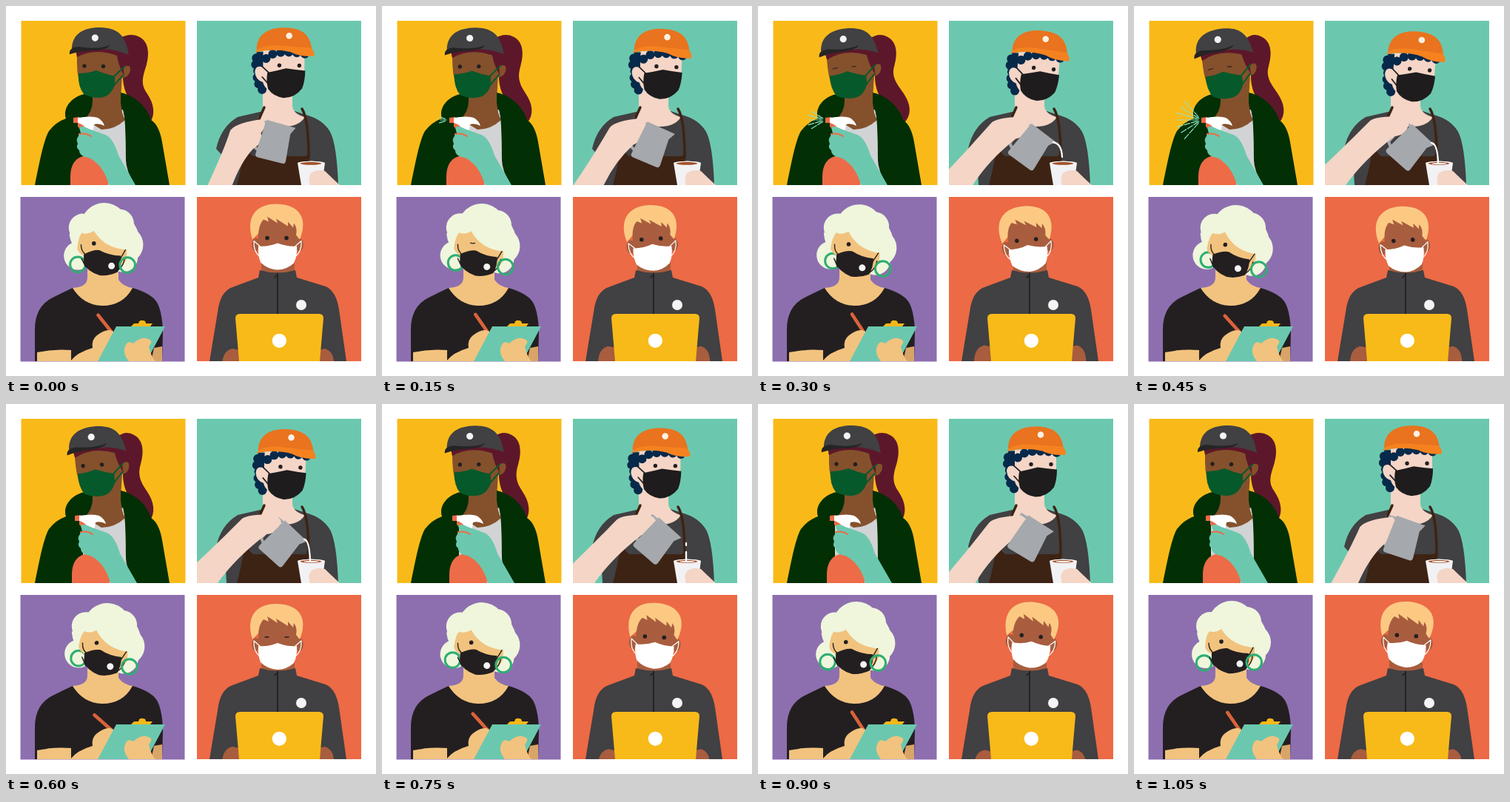
An HTML page that plays this animation: 500 by 500 pixels, repeating every 1200 ms.

```html
<!DOCTYPE html>
<html lang="en">
<head>
<meta charset="utf-8">
<title>Four masked workers</title>
<style>
  html, body { margin: 0; width: 100%; height: 100%; overflow: hidden; background: #fff; }
  svg { display: block; width: 100vw; height: 100vh; }
  .line { fill: none; stroke-linecap: round; stroke-linejoin: round; }
</style>
</head>
<body>
<svg viewBox="0 0 500 500">
  <defs>
    <clipPath id="c1"><rect x="20.5" y="20" width="222" height="222"/></clipPath>
    <clipPath id="c2"><rect x="258" y="20" width="222" height="222"/></clipPath>
    <clipPath id="c3"><rect x="19.5" y="258" width="222" height="222.5"/></clipPath>
    <clipPath id="c4"><rect x="258" y="258" width="222" height="222"/></clipPath>
  </defs>

  <!-- Cleaner -->
  <g clip-path="url(#c1)">
    <rect x="20" y="20" width="223" height="223" fill="#f9ba19"/>
    <path id="ponytail" fill="#5d172a"/>
    <path fill="#022f04" d="M39 242C45 212 51 181 58 169Q67 157 81 152C76 137 90 120 112 118L155 117C178 122 192 140 196 154Q207 161 211 184L221 242Z"/>
    <path fill="#d2d3d5" d="M104 152L158 140Q162 150 162 208L176 242H104Z"/>
    <path fill="#84512c" d="M117 100L157 92L155 128Q156 146 161 154Q147 167 129 167L106 153Q117 143 117 128Z"/>
    <path fill="#022f04" d="M155 117L182 140L205 242H174Q162 222 162 208C162 170 163 150 155 130Z"/>
    <g id="cleanerHead">
      <path fill="#84512c" d="M96 58H160V82Q169 78 168 87Q166 97 156 97Q153 114 136 122Q118 128 104 115Q96 100 96 78Z"/>
      <path fill="#5d172a" d="M94 58L166 58V80H160Q158 87 160 95Q153 84 150 67Q120 56 96 69Z"/>
      <path fill="#414042" d="M89 58C90 36 106 29 128 29C150 30 162 38 166 66Q148 58 128 58Z"/>
      <path fill="#252425" d="M86 65Q85 56 98 55Q125 59 141 53Q137 59 120 60Q102 60 86 65Z"/>
      <circle cx="120.5" cy="43" r="4.6" fill="#f4f4f4"/>
      <path class="line" stroke="#06592b" stroke-width="2" d="M144 97L160 82M145 108L158 94"/>
      <path fill="#06592b" d="M98 91Q111 91 122 87Q134 92 147 95V107Q142 120 132 123Q119 126 105 119Q97 109 98 91Z"/>
      <g class="eyes" fill="#231f20"><circle cx="106" cy="81" r="2.7"/><circle cx="131.5" cy="81.5" r="2.7"/></g>
      <path class="line lids" stroke="#231f20" stroke-width="1.2" d="M103 82L109 81M129 81L134.5 81.5"/>
    </g>
    <path id="spray" class="line" stroke="#8ce0c6" stroke-width="1.2"/>
    <g id="bottle">
      <path fill="#ed6b47" d="M87 242V231Q87 208 104 203V190H121V204Q135 210 138 226V242Z"/>
      <path fill="#ed6b47" d="M91 151L99 150V158H91ZM97 158L116 157V176H101Q102 166 97 163Z"/>
      <path fill="#fff" d="M97 151Q116 148 124 151Q131 155 133 162Q126 158 119 160L117 171H107Q109 161 97 158Z"/>
      <path fill="#6bc8ae" d="M99 164Q104 161 112 166L134 174Q145 178 152 202L175 242H139Q132 215 112 205Q99 203 99 195Q94 192 97 186Q94 180 98 176Q98 172 101 172Z"/>
      <path class="line" stroke="#ed6b47" stroke-width="2" d="M99 173Q108 171 115 176"/>
    </g>
  </g>

  <!-- Barista -->
  <g clip-path="url(#c2)">
    <rect x="258" y="20" width="222" height="222" fill="#6bc8ae"/>
    <path fill="#414042" d="M298 242L296 206L284 193Q290 164 313 150L348 142H390L405 147Q428 153 438 170Q447 187 449 242Z"/>
    <path fill="#f4d5c6" d="M347 98H387V135Q388 146 404 150Q396 163 375 163Q352 162 340 151Q347 148 347 138Z"/>
    <path class="line" stroke="#3d2314" stroke-width="3.5" d="M349 137Q338 160 327 195M400 139Q409 153 409 205"/>
    <path fill="#3d2314" d="M324 182Q326 198 334 203H405L410 198L411 242H312Q320 212 324 182Z"/>
    <path id="handle" class="line" stroke="#a5a8ac" stroke-width="4" d="M-18 -22H-26V13L-18 17"/>
    <path id="pourArm" fill="#f4d5c6"/>
    <path id="jug" fill="#a5a8ac" d="M-18 -26L23 -25L18 -15L21 22Q21 26 17 26H-17Q-21 26 -21 22Z"/>
    <path fill="#f2f1f4" d="M394 212Q412 207 431 212L427 242H399Z"/>
    <ellipse cx="412.5" cy="212.5" rx="18.5" ry="2.8" fill="#fff"/>
    <ellipse cx="412" cy="212.8" rx="14.5" ry="2" fill="#a2512b"/>
    <ellipse id="foam" cx="412.5" cy="213" rx="10" ry="1.1" fill="#fff"/>
    <path id="milk" class="line" stroke="#fff" stroke-width="2.3"/>
    <path fill="#f4d5c6" d="M411 242Q407 231 413 225Q421 220 431 223Q440 232 451 242Z"/>
    <g id="baristaHead">
      <path id="curls" class="line" stroke="#07294a" stroke-width="12" stroke-dasharray="0 9" d="M346 113Q337 103 340 88Q333 76 341 64"/>
      <path fill="#07294a" d="M338 62H354V110L347 118Q339 108 338 62Z"/>
      <path fill="#f4d5c6" d="M347 60H403V100Q394 123 375 123Q350 116 347 103Q337 100 336 89Q337 79 347 83Z"/>
      <path class="line" stroke="#07294a" stroke-width="12" stroke-dasharray="0 11" d="M351 71Q362 57 408 65"/>
      <path fill="#e9731e" d="M338 59C338 39 352 29 376 29C400 29 411 39 413 60Z"/>
      <path fill="#f5821f" d="M336 63Q341 53 366 53L411 56Q416 59 416 67Q398 69 384 62Q360 56 336 63Z"/>
      <circle cx="382" cy="40" r="4.3" fill="#fff0e2"/>
      <path class="line" stroke="#1e1c1d" stroke-width="1.7" d="M346 82L356 91M346 96L356 107"/>
      <path fill="#1e1c1d" d="M353 90Q367 87 378 84Q391 86 404 87Q404 101 400 111Q390 124 375 124Q361 122 354 112Q351 101 353 90Z"/>
      <g fill="#231f20"><circle cx="369" cy="80" r="2.7"/><circle cx="396" cy="80" r="2.7"/></g>
    </g>
  </g>

  <!-- Clerk -->
  <g clip-path="url(#c3)">
    <rect x="19" y="258" width="223" height="223" fill="#8d6fb0"/>
    <g id="hairBack" fill="#eff6dc">
      <circle cx="97" cy="338" r="19"/><circle cx="160" cy="322" r="25"/><circle cx="158" cy="339" r="20"/>
      <circle cx="103" cy="300" r="19"/><circle cx="132" cy="298" r="32"/><circle cx="152" cy="294" r="20"/>
    </g>
    <path fill="#231f20" d="M39 480V437Q39 406 63 394Q77 387 90 381H171Q195 388 203 399Q211 411 212 440L211 480Z"/>
    <path fill="#f2c37f" d="M110 348H152V370Q158 379 171 381Q158 405 130 405Q104 404 90 381Q110 380 110 367ZM42 468Q65 463 88 465V480H42Z"/>
    <circle id="ringL" class="line" stroke="#2fae72" stroke-width="3" r="10.3"/>
    <g id="clerkHead">
      <path fill="#f2c37f" d="M96 300H163V342Q152 363 128 364Q108 357 104 337Q94 333 95 319Z"/>
      <path fill="#eff6dc" d="M85 310Q95 280 130 270Q177 278 181 320L164 347V329Q133 328 118 304Q109 310 102 307Q97 312 96 329Q88 326 85 310Z"/>
      <path class="line" stroke="#231f20" stroke-width="1.4" d="M101 323Q101 333 109 337M108 353L102 342M154 342L161 329M151 357Q160 350 160 340"/>
      <path fill="#231f20" d="M105 336Q118 329 126 330Q139 337 155 337Q156 350 151 359Q139 365 127 364Q110 359 105 348Z"/>
      <circle id="clerkEye" cx="118" cy="321" r="2.8" fill="#231f20"/>
      <path id="clerkLid" class="line" stroke="#231f20" stroke-width="1.3" d="M118 320Q121 321 124 320"/>
      <circle id="maskDot" cx="143" cy="351" r="4.5" fill="#f4f4f4"/>
    </g>
    <circle id="ringR" class="line" stroke="#2fae72" stroke-width="3" r="10.3"/>
    <path id="pen" class="line" stroke="#d9633a" stroke-width="4.6"/>
    <path fill="#f2c37f" d="M87 480Q96 468 117 462Q115 451 123 445Q133 437 141 438Q149 440 149 452L146 480Z"/>
    <path fill="#d9a467" d="M200 462L211 460V480H196Z"/>
    <path fill="#6bc8ae" d="M149 433H215L190 480H124Z"/>
    <path fill="#f6b719" d="M169 433L173 429H179Q180 424 185 425Q189 425 189 429H198L195 433Z"/>
    <path fill="#f2c37f" d="M166 480Q157 469 161 460Q164 451 172 456Q183 446 192 450Q200 452 193 460Q196 474 202 480Z"/>
  </g>

  <!-- Laptop worker -->
  <g clip-path="url(#c4)">
    <rect x="258" y="258" width="222" height="222" fill="#ec6a45"/>
    <path fill="#a85d3e" d="M345 325H390V369H345Z"/>
    <path fill="#414042" d="M275 480L286 414Q289 386 306 380L341 367L343 357Q367 364 391 357L393 367L432 379Q446 385 450 410L460 480Z"/>
    <path class="line" stroke="#1f1d1e" stroke-width="1.6" d="M367 361V417M367 363L363 367"/>
    <circle cx="399" cy="404" r="7" fill="#f4f4f4"/>
    <path id="laptopHands" fill="#a85d3e" d="M292 490Q291 466 306 463L320 466V490ZM443 490Q445 467 431 463L418 466V490Z"/>
    <path fill="#f8ba19" d="M316 416H423Q429 416 429 422L424 480H315L310 422Q310 416 316 416Z"/>
    <circle cx="369.3" cy="452.3" r="9.6" fill="#fff"/>
    <g id="typistHead">
      <ellipse cx="338" cy="322" rx="6" ry="9" fill="#a85d3e"/><ellipse cx="396" cy="322" rx="6" ry="9" fill="#a85d3e"/>
      <path fill="#a85d3e" d="M341 285H394V325Q389 353 368 354Q345 350 341 325Z"/>
      <path fill="#fcc983" d="M333 315C324 286 336 267 366 267C399 268 408 289 397 315L392 309Q394 299 389 293L388 299L381 291V297L365 287L367 293L353 284L355 291L348 288Q342 294 341 307Z"/>
      <path class="line" stroke="#fff" stroke-width="1.2" d="M343 324L335 317Q334 332 344 339M391 324L399 317Q400 332 390 339"/>
      <path fill="#fff" d="M341 324Q355 325 367 320Q380 325 393 324Q394 337 389 347Q379 356 367 356Q353 355 344 346Q340 336 341 324Z"/>
      <g class="eyes" fill="#231f20"><circle cx="353" cy="313" r="2.8"/><circle cx="379" cy="313" r="2.8"/></g>
      <path class="line lids" stroke="#231f20" stroke-width="1.3" d="M350 312H355M377 312H382"/>
    </g>
  </g>
</svg>
<script>
const STEP = 150, STEPS = 8;
const $ = id => document.getElementById(id);
const set = (id, name, value) => $(id).setAttribute(name, value);
const show = (node, on) => { node.style.display = on ? "" : "none"; };

function turn(id, angle, x, y, drop) {
  set(id, "transform", `translate(0 ${drop}) rotate(${angle} ${x} ${y})`);
}

function place(id, x, y) {
  set(id, "cx", x);
  set(id, "cy", y);
}

function blink(id, closed) {
  show($(id).querySelector(".eyes"), !closed);
  show($(id).querySelector(".lids"), closed);
}

// Fan of droplets that widens and lengthens with each puff.
function sprayPath(puff) {
  let d = "";
  for (let ring = 0; ring < puff; ring++) {
    for (let i = -puff; i <= puff; i++) {
      const start = 4 + 10 * ring + 2 * (i & 1), angle = i * .28;
      const at = r => `${91 - r * Math.cos(angle)} ${154 + r * Math.sin(angle)}`;
      d += `M${at(start)}L${at(start + 8)}`;
    }
  }
  return d;
}

function drawCleaner(step, wave) {
  const nod = wave(3) ** 2;
  turn("cleanerHead", -7 * nod, 128, 103, nod);
  blink("cleanerHead", step === 2 || step === 3);

  const a = 3 - 8 * wave(3.5), b = 7 * wave(2) ** 3;
  set("ponytail", "d", `M150 45Q${166 + a} 35 ${178 + a} 42C${191 + a} 49 ${191 + a} 66 ${187 + a} 80` +
    `C${182 + a} 96 ${181 + b} 105 ${189 + b} 117C${200 + b} 133 ${201 + b} 147 ${194 + b / 2} 158` +
    `Q${188 + b / 2} 147 176 136Q157 120 158 92Z`);

  const slide = 2 * Math.min(3, Math.max(0, step - 3));
  set("bottle", "transform", `translate(${slide} 0)`);
  set("spray", "d", step < 4 ? sprayPath(step) : "");
}

function drawBarista(step, wave) {
  turn("baristaHead", 5 * wave(2.5) ** 2, 370, 125, 5 * wave(3.5));

  const w = Math.sin(wave(3.8) * Math.PI / 2);
  set("pourArm", "d", `M${273 - 45 * w} 242` +
    `C${285 - 20 * w} ${215 - 7 * w} ${297 - 7 * w} ${188 - 4 * w} ${303 + 15 * w} ${168 - 12 * w}` +
    `Q${312 + 12 * w} ${157 - 8 * w} ${347 + 14 * w} ${153 - 4 * w}` +
    `Q${354 + 22 * w} ${160 - 4 * w} ${344 + 26 * w} ${172 - 8 * w}` +
    `Q${350 + 18 * w} ${182 - 8 * w} ${334 + 18 * w} ${193 - 17 * w}` +
    `Q${318 - 8 * w} ${210 - 2 * w} ${306 - 20 * w} 242Z`);

  const x = 363 + 10 * wave(3.8), y = 181 + 10 * wave(2.7), tilt = 14 + 28 * w;
  for (const id of ["jug", "handle"]) set(id, "transform", `translate(${x} ${y}) rotate(${tilt})`);

  const pouring = step >= 2 && step <= 4;
  const stream = `M${x + 30} ${y - 6}Q410 ${y - 5} 411 ${Math.min(212, 184 + 10 * step)}`;
  set("milk", "d", pouring ? stream : step === 5 ? "M411 188V191M411 200V212" : "");
  show($("foam"), step > 2);
}

function drawClerk(step, wave, angle) {
  const tilt = 6.5 * wave(3);
  for (const id of ["clerkHead", "hairBack"]) turn(id, tilt, 133, 348, 3 * wave(3.5));
  show($("clerkEye"), step !== 1);
  show($("clerkLid"), step === 1);
  set("clerkEye", "cx", 118 + tilt / 3);
  set("maskDot", "cx", 143 - tilt / 3);
  place("ringL", 94 + 7 * wave(2.2), 350 - 7 * wave(3.2));
  place("ringR", 162 + 7 * wave(2.5), 349 + 7 * wave(3));

  const penX = 124.5 + 2.5 * (Math.cos(angle) - Math.cos(2 * angle));
  set("pen", "d", `M${penX} ${418 + (124 - penX) / 2}L143 441`);
}

function drawTypist(step, wave, angle) {
  const sway = -Math.sin(angle);
  turn("typistHead", 5 * sway, 367, 350, 3.5 * wave(3));
  blink("typistHead", step === 4);
  set("laptopHands", "transform", `translate(0 ${4.5 * sway})`);
}

function draw(step) {
  const angle = 2 * Math.PI * step / STEPS;
  // Rises from 0 to 1 and back once per loop, highest at the given step.
  const wave = peak => .5 + .5 * Math.cos(angle - 2 * Math.PI * peak / STEPS);
  drawCleaner(step, wave);
  drawBarista(step, wave);
  drawClerk(step, wave, angle);
  drawTypist(step, wave, angle);
}

function tick() {
  draw(Math.floor(performance.now() / STEP) % STEPS);
  requestAnimationFrame(tick);
}
tick();
</script>
</body>
</html>
```
